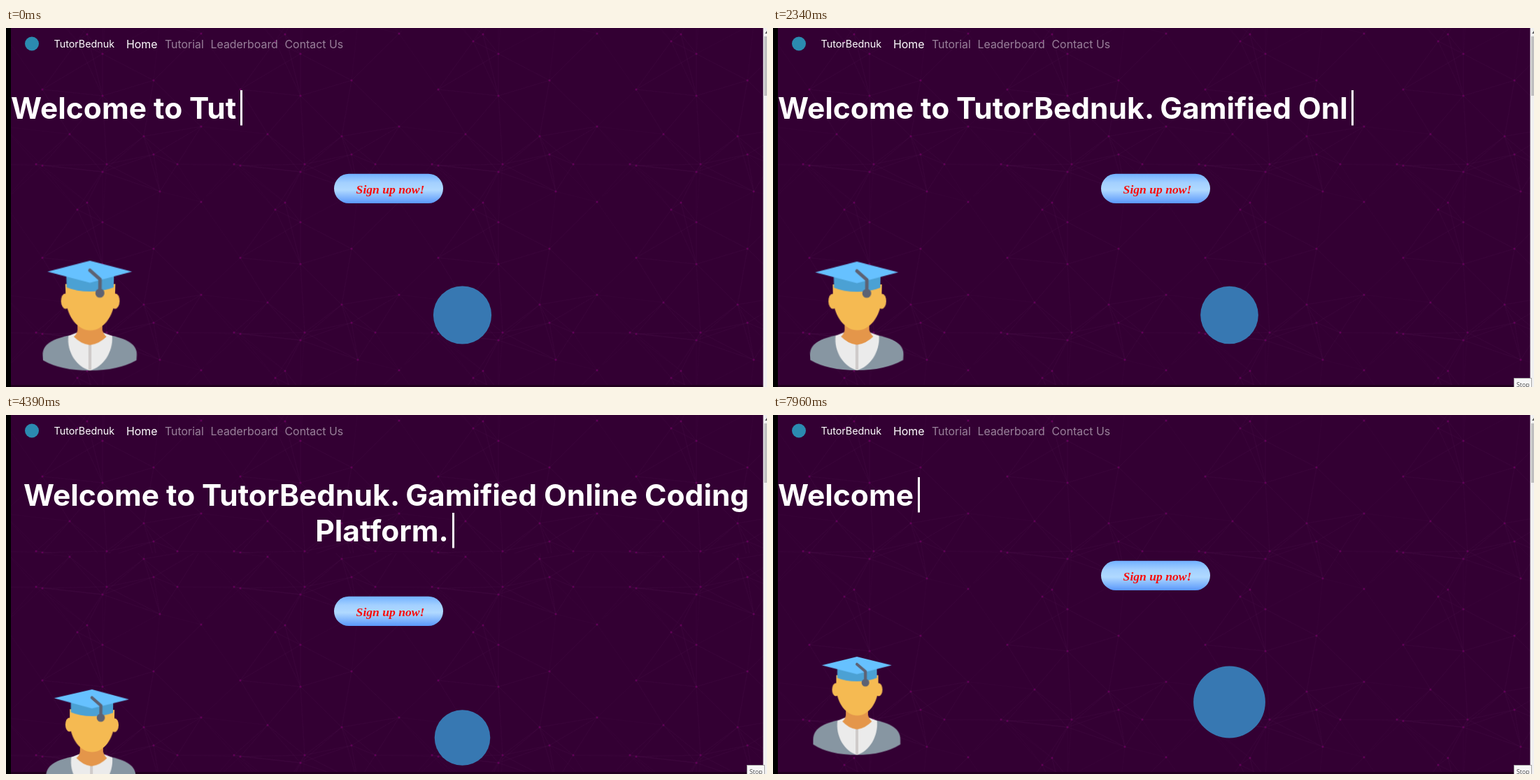
An HTML page for the animation above (8000 ms loop, 1088x514 px).

```html
<!DOCTYPE html>
<html lang="en">
<head>
<meta charset="utf-8">
<title>Online coding platform</title>
<style>
  html, body { margin: 0; width: 100%; height: 100%; overflow: hidden; background: #330033; }
  #stage { position: relative; width: 100%; height: 100%; overflow: hidden; contain: strict; }
  svg { position: absolute; left: 0; top: 0; display: block; }
  text { white-space: pre; }
  #avatar { transform-origin: 120px 431px; }
  .title { font: 700 42.5px Inter, sans-serif; fill: #fff; }
  .nav { font: 400 15.9px Inter, sans-serif; fill: #99809a; }
  .brand { font: 400 14.3px Inter, sans-serif; fill: #fff; }
</style>
</head>
<body>
<div id="stage">
<svg width="1088" height="514" viewBox="0 0 1088 514">
  <defs>
    <pattern id="web" width="283" height="241" patternUnits="userSpaceOnUse"></pattern>
    <linearGradient id="shine" x1="0" y1="0" x2="0" y2="1">
      <stop offset="0" stop-color="#70b0ff"/>
      <stop offset=".3" stop-color="#a3d0ff"/>
      <stop offset=".55" stop-color="#b0d9ff"/>
      <stop offset="1" stop-color="#5a98fb"/>
    </linearGradient>
  </defs>
  <rect width="1088" height="514" fill="#330033"/>
  <rect width="1088" height="200" fill="url(#web)"/>
  <g id="lower">
    <rect y="147" width="1088" height="367" fill="#330033"/>
    <rect y="147" width="1088" height="367" fill="url(#web)"/>
    <rect x="469" y="208.700" width="156" height="42.300" rx="21.150" fill="url(#shine)"/>
    <text x="549.500" y="236.500" text-anchor="middle" fill="#f60c0c"
      style="font: italic 700 17.600px 'Liberation Serif', serif">Sign up now!</text>
    <circle id="disc" cx="652.500" cy="411" r="48" fill="#3778b2"/>
  </g>
  <rect y="511" width="1088" height="3" fill="#22001f"/>

  <circle cx="37" cy="22.500" r="10" fill="#2b8bb0"/>
  <text class="brand" id="brand" x="68.500" y="28"></text>
  <text class="nav" x="172" y="28.500" style="fill:#fff">Home</text>
  <text class="nav" x="227" y="28.500">Tutorial</text>
  <text class="nav" x="292.500" y="28.500">Leaderboard</text>
  <text class="nav" x="398.500" y="28.500">Contact Us</text>

  <g id="line1"></g>
  <text class="title" id="line2" y="181"></text>
  <rect id="caret" width="3" height="50.500" fill="#fff"/>
</svg>

<svg id="avatar" width="1088" height="514" viewBox="0 0 1088 514">
  <path d="M57 465C57 447 76 440 103 435.500H137C164 440 182.500 447 182.500 465V472Q158 487 120 487Q80 487 57 472Z" fill="#8796a2"/>
  <path d="M92 438L104 433H136L149 438C151 460 138 482 120 487C102 482 89 460 92 438Z" fill="#ebebeb"/>
  <rect x="118" y="449" width="4" height="37.500" fill="#cfcbca"/>
  <path d="M104 418H136V430Q138 436 141.500 439Q132 449 120 450.500Q108 449 99 439Q103 436 104 430Z" fill="#e4964a"/>
  <ellipse cx="89.500" cy="393" rx="5.500" ry="9.500" fill="#f5ba52"/>
  <ellipse cx="151.500" cy="393" rx="5.500" ry="9.500" fill="#f5ba52"/>
  <path d="M90 372H151V391C150 412 137 430.500 120.500 430.500C104 430.500 91 412 90 391Z" fill="#f5ba52"/>
  <path d="M91.500 360H149V376Q137 381 120 381Q103 381 91.500 376Z" fill="#4ba1d4"/>
  <path d="M69 357.500L120 345L170.500 357.500L120 370.500Z" fill="#66c1ff"/>
  <path d="M120 356L132.300 366.500V383" fill="none" stroke="#5d6273" stroke-width="4.200" stroke-linecap="round" stroke-linejoin="round"/>
  <circle cx="132.300" cy="383" r="5.600" fill="#5d6273"/>
</svg>

<svg width="1088" height="514" viewBox="0 0 1088 514">
  <rect width="7" height="514" fill="#000"/>
  <rect x="1082.500" width="5.500" height="514" fill="#f1f1f1"/>
  <rect x="1084" y="12" width="4" height="85" fill="#c1c1c1"/>
  <path d="M1085 8L1088 4V8Z" fill="#606060"/>
  <g id="tip">
    <rect x="1059.500" y="501.500" width="25" height="16" fill="#f7f7f7" stroke="#a5a5a5"/>
    <text x="1063" y="514" fill="#4a4a4a" style="font: 8.800px 'Open Sans', sans-serif">Stop</text>
  </g>
</svg>
</div>

<script>
const LOOP = 8000, CYCLE = 2485, WRAP = 51;
const TILE_W = 283, TILE_H = 241;
const NAME = "TutorBednuk";
const $ = id => document.getElementById(id);

function add(parent, tag, attrs) {
  const el = document.createElementNS("http://www.w3.org/2000/svg", tag);
  for (const k in attrs) el.setAttribute(k, attrs[k]);
  return parent.appendChild(el);
}

// Faint web of linked points, repeated as a tile
const dots = [[211, 75], [52, 88], [279, 141], [91, 152], [197, 155], [43, 195],
  [144, 195], [245, 195], [138, 97], [211, 181], [52, 197], [279, 8], [102, 19],
  [138, 37], [116, 9], [220, 234], [138, 206]];
const around = [-1, 0, 1].flatMap(i => [-1, 0, 1].flatMap(j =>
  dots.map(([x, y]) => [x + i * TILE_W, y + j * TILE_H])));
for (const [x, y] of dots) {
  const links = around.filter(([u, v]) => Math.hypot(u - x, v - y) < 100)
    .map(([u, v]) => `M${x} ${y}L${u} ${v}`).join("");
  add($("web"), "path", { d: links, stroke: "#480a48", "stroke-width": .6, opacity: .2 });
}
for (const [cx, cy] of dots) add($("web"), "circle", { cx, cy, r: 1.5, fill: "#600057" });

$("brand").textContent = NAME;
const parts = [["Welcome to ", 7], [NAME, 262], [". ", 531], ["Gamified Online Coding ", 553.2]]
  .map(([str, x]) => ({ str, x, el: add($("line1"), "text", { class: "title", x, y: 130 }) }));
const first = parts.reduce((n, p) => n + p.str.length, 0);
const second = "Platform.";

// Number of letters on show
function typed(t) {
  const steps = (from, ms) => Math.floor((t - from) / ms);
  if (t < 1520) return Math.min(24, 14 + steps(-35, 70));
  if (t < 4715) return Math.min(56, 25 + steps(1520, 70));
  if (t < 6520) return Math.max(24, 56 - steps(4715, 43));
  if (t < 7540) return Math.max(0, 23 - steps(6520, 43));
  return 1 + steps(7540, 70);
}

// The caret blinks only while typing rests
function blink(t) {
  const from = t >= 665 && t < 1520 ? 665 : t >= 3690 && t < 4715 ? 3690 : null;
  return from === null ? 1 : .5 + .5 * Math.cos((t - from) / 700 * 2 * Math.PI);
}

// Eased value between [time, value] keys
function ease(keys, t) {
  const i = Math.max(1, keys.findIndex(k => k[0] >= t));
  const [a, u] = keys[i - 1], [b, v] = keys[i];
  return u + (v - u) * (.5 - .5 * Math.cos(Math.PI * (t - a) / (b - a)));
}

const pitch = [[0, 1], [480, -.1], [760, .1], [1540, .33], [1905, .3], [CYCLE, 1]];
const yaw = [[0, 0], [700, 0], [1500, 1], [2150, 0], [CYCLE, 0]];
const spread = [[0, 111], [320, 176], [505, 160], [900, 102], [1200, 108], [1530, 176], [1900, 102], [CYCLE, 111]];

function drawText(t) {
  const n = typed(t), wrapped = n > first, shift = wrapped ? 18 : 0;
  let left = Math.min(n, first), x = 7;
  for (const p of parts) {
    const str = p.str.slice(0, left);
    if (p.el.textContent !== str) p.el.textContent = str;
    if (str) x = p.x + p.el.getComputedTextLength();
    left -= str.length;
  }
  $("line1").setAttribute("transform", `translate(${shift})`);
  const line2 = $("line2");
  line2.textContent = wrapped ? second.slice(0, n - first) : "";
  if (wrapped) {
    const w = line2.getComputedTextLength(), start = 545 - (w + 15) / 2;
    line2.setAttribute("x", start);
    x = start + w;
  }
  const caret = $("caret");
  caret.setAttribute("x", Math.round(x + 5.5));
  caret.setAttribute("y", wrapped ? 140 : 89);
  caret.setAttribute("opacity", blink(t));
  return wrapped ? WRAP : 0;
}

function draw(t) {
  const drop = drawText(t), c = t % CYCLE;
  $("lower").setAttribute("transform", `translate(0 ${drop})`);
  $("disc").setAttribute("r", (97 + ease(spread, c)) / 5);
  const p = ease(pitch, c), q = ease(yaw, c), s = 1 + .106 * p;
  const m = [s, .0226 * q, 0, .00045 * q, -.021 * q, s * (1 - .03 * p), 0, .00096 * p,
    0, 0, 1, 0, 7.6 * q, 2.5 * p + q, 0, 1];
  $("avatar").style.top = drop + "px";
  $("avatar").style.transform = `matrix3d(${m.map(v => v.toFixed(6)).join()})`;
  $("tip").style.display = t < 1200 ? "none" : "";
}

const begin = performance.now();
function tick() {
  draw((performance.now() - begin) % LOOP);
  requestAnimationFrame(tick);
}
tick();
</script>
</body>
</html>
```
